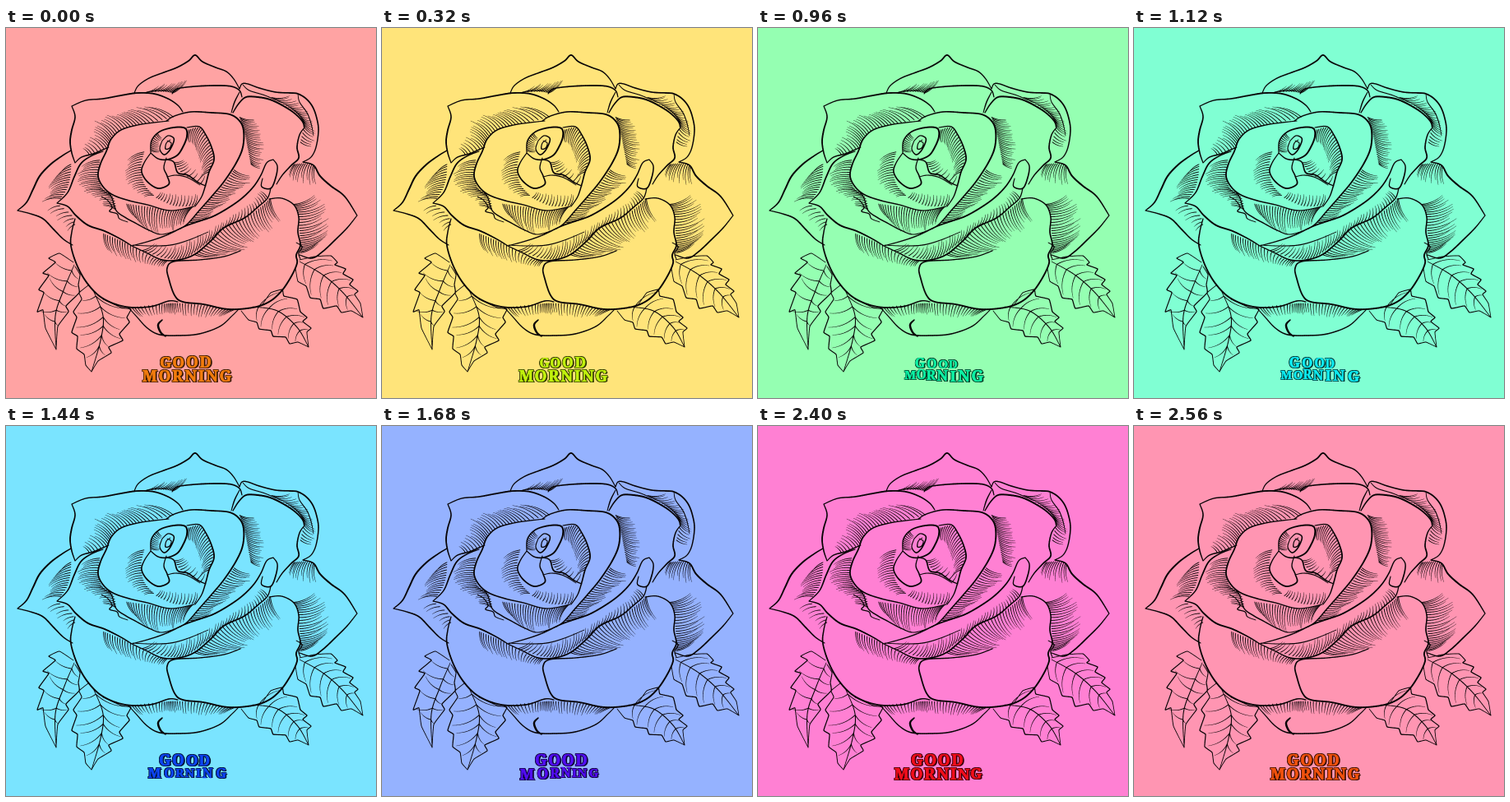
Write an HTML page with a canvas that moves like this. It is 450x450 px and loops after 2.64 s.

```html
<!DOCTYPE html>
<html lang="en">
<head>
<meta charset="utf-8">
<title>Good morning rose</title>
<style>
  html, body { margin: 0; width: 100%; height: 100%; overflow: hidden; }
  body { position: relative; background: #ffa3a3; }
  canvas { position: absolute; left: 0; top: 0; width: 450px; height: 450px; }
  .line {
    position: absolute; left: 140px; width: 160px; height: 17px;
    display: flex; justify-content: center;
    font: 900 19px/17px "Noto Serif", serif;
    color: var(--ink);
  }
  .line span {
    margin: 0 .8px;
    -webkit-text-stroke: .7px var(--ink);
    text-shadow: -1px -1px var(--edge), 1px -1px var(--edge), -1px 1px var(--edge),
      1px 1px var(--edge), 2px 1px var(--edge), -1px 0 var(--edge), 1px 0 var(--edge);
  }
  #good { top: 398px; margin-left: -2px; }
  #morning { top: 415px; }
</style>
</head>
<body>
<canvas id="rose" width="900" height="900"></canvas>
<div class="line" id="good"></div>
<div class="line" id="morning"></div>
<script>
const ctx = document.getElementById('rose').getContext('2d');
ctx.scale(2, 2);
ctx.lineCap = 'round';
ctx.strokeStyle = '#080406';

let seed = 7;
const rand = () => (seed = seed * 16807 % 2147483647) / 2147483647;
const mix = (a, b, u) => [a[0] + (b[0] - a[0]) * u, a[1] + (b[1] - a[1]) * u];

// Cubic through the points of "x y x y ..."; tension 0 gives straight pieces.
function curve(text, tension = .5) {
  const n = text.match(/\d+/g).map(Number), p = [];
  for (let i = 0; i < n.length; i += 2) p.push([n[i], n[i + 1]]);
  const last = p.length - 1;
  const at = u => {
    const s = Math.min(Math.max(u, 0), 1) * last, i = Math.min(Math.floor(s), last - 1), t = s - i;
    const a = p[Math.max(i - 1, 0)], b = p[i], c = p[i + 1], d = p[Math.min(i + 2, last)];
    if (!tension) return mix(b, c, t);
    const t2 = t * t, t3 = t2 * t;
    return [0, 1].map(k =>
      (2 * t3 - 3 * t2 + 1) * b[k] + (t3 - 2 * t2 + t) * tension * (c[k] - a[k]) +
      (3 * t2 - 2 * t3) * c[k] + (t3 - t2) * tension * (d[k] - b[k]));
  };
  at.steps = last * 10;
  return at;
}

function stroke(at, steps, width) {
  for (let i = 0; i < steps; i++) {
    ctx.lineWidth = width((i + .5) / steps);
    ctx.beginPath();
    ctx.moveTo(...at(i / steps));
    ctx.lineTo(...at((i + 1) / steps));
    ctx.stroke();
  }
}

function line(text, w = 1.7, tension) {
  const c = curve(text, tension);
  stroke(c, c.steps, u => w * (.6 + .4 * Math.sin(Math.PI * u)));
  return c;
}

function hair(a, b, bend, w = .95) {
  const dx = b[0] - a[0], dy = b[1] - a[1];
  const at = u => {
    const [x, y] = mix(a, b, u), k = bend * 4 * u * (1 - u);
    return [x - dy * k, y + dx * k];
  };
  stroke(at, 8, u => w * (1 - .65 * u));
}

// Tapering hairs rooted on one curve, ending near another.
function hatch(from, to, n, bend = .08) {
  const a = curve(from), b = curve(to);
  for (let i = 0; i < n; i++) {
    const u = (i + .5) / n, root = a(u);
    hair(root, mix(root, b(u), .72 + .28 * rand()), bend);
  }
}

function leaf(left, right, rib) {
  const sides = [line(left, 1.2, .18), line(right, 1.2, .18)], mid = line(rib, 1.1);
  sides.forEach((side, k) => {
    for (let u = .1; u < .85; u += .125) {
      const root = mid(u);
      hair(root, mix(root, side(u + .12), .88), k ? .1 : -.1);
    }
  });
}

// Back petals
line('156 79 161 70 174 61 192 54 208 48 222 40 230 33 239 41 255 48 268 53 277 62 284 74');
line('202 80 208 74 230 71 255 70 274 71 284 76 287 84');
line('284 78 278 90 274 103', 1.4);
hatch('170 78 190 77 204 79', '190 68 208 66 222 62', 12);
line('284 74 287 68 294 68 308 73 328 78 346 79 355 80 365 86 373 96 378 110 380 125 377 145 371 157 361 163');
line('355 80 357 90 366 103 371 116 374 131', 1.1);
line('288 69 296 76 315 82 336 91', 1.1);
hatch('322 84 342 95 356 106 362 118 358 140', '345 82 362 95 372 112 376 130 374 146', 24);

// Upper petals
line('215 102 209 94 197 86 180 80 160 79 140 82 118 86 97 88 80 95', 1.8);
line('80 95 84 108 80 124 78 138 80 152 84 164', 1.8);
line('84 164 92 157 106 153 118 148 125 145', 1.5);
hatch('100 154 122 146 130 130 150 120 175 115 205 108', '92 146 103 130 108 112 128 104 145 98 172 95', 32);
line('276 103 283 92 292 84 306 84 321 87 336 94 350 103 360 113 363 121', 2);
line('363 121 357 130 354 145 356 158 347 167 336 179 329 190', 1.7);
hatch('284 108 290 125 294 145 298 166', '303 111 312 130 314 152 310 172', 26);

// Outer side petals
line('79 149 69 155 54 166 41 180 33 196 25 212 14 222', 2);
line('14 222 30 226 45 232 58 245 70 257 81 264');
hatch('79 165 78 180 74 195 66 208', '62 180 52 192 48 203 42 212', 15);
hatch('64 215 80 228 84 240', '47 222 62 234 76 248', 7);
line('361 163 374 167 382 180 395 192 412 205 427 228', 2);
line('427 228 415 243 400 258 385 272 372 280 357 276');
hatch('350 166 363 165 376 168', '342 183 356 188 378 192', 12);
hatch('350 214 356 225 357 245 359 262 358 274', '381 200 390 215 393 233 391 250 381 262', 24);

// Left middle petal
line('62 213 75 200 83 181 91 165 103 156 118 150');
line('62 213 75 217 85 228 100 240 120 247 140 257 153 265', 1.9);
hatch('114 160 112 178 116 194 130 206 134 222', '92 168 85 182 90 195 108 206 118 216', 25);
line('116 205 124 210 129 218 126 223 135 226 138 232 148 236', 1.2);

// Inner left petal and the ones in front of it
line('198 113 180 115 160 118 140 124 128 135 122 150 115 165 112 180 118 193 130 203 150 210 172 215 200 222 229 217');
line('118 193 128 205 134 222 146 231 157 237 174 246 190 251 213 244', 1.4);
hatch('168 150 164 170 168 190 180 204', '148 160 143 178 150 194 168 206', 20);
hatch('146 214 175 218 205 222 228 217', '160 234 178 250 200 249 216 238', 28);

// Upper centre petal
line('195 113 205 107 225 102 250 103 272 105 284 113 289 125 288 145 280 164 265 187 250 205 235 222 222 237 214 243', 1.9);
hatch('222 237 240 216 262 194 278 172', '246 231 268 212 288 196 303 182', 26);

// Bud
line('176 152 177 137 187 126 204 121 218 122 220 132 215 145 208 155 196 160 185 159 176 152', 1.9);
line('190 137 197 131 204 134 203 141 198 150 192 154 187 147 190 137', 1.5);
line('196 137 201 140 199 146 194 147 195 140 200 136', 1.2);
line('176 152 168 164 165 175 172 187 185 195 198 190 196 180 192 170 195 158');
line('195 160 204 163 209 176 221 179 234 188 243 192', 1.7);
line('220 121 235 120 243 130 250 145 253 160 247 175 243 190 238 205 230 217');
line('196 181 207 179 221 182 236 191', 1.2);
hatch('177 150 177 138 185 128', '190 152 186 142 190 134', 11);
hatch('222 124 236 122 246 138 252 156 246 176', '222 140 228 146 234 158 238 170 236 184', 22);
hatch('205 163 214 176 238 190', '216 160 226 168 243 180', 10);
hatch('182 206 205 216 230 216', '188 199 208 202 235 200', 14);

// Folded front lip
line('325 160 317 164 310 179 301 193 287 207 270 219 252 229 235 235 218 241 195 252 175 259 153 265', 1.8);
line('325 160 330 168 328 182 322 195 311 193 312 183', 1.6);
line('322 195 318 207 306 218 290 231 265 243 250 258 230 275 210 282 190 282 170 273 153 265', 1.8);
line('154 264 175 265 200 264 222 258 246 248', 1.2);
hatch('165 270 195 280 220 278 245 260 270 240 300 224 318 205', '180 262 205 264 225 256 250 243 275 228 297 212 308 196', 42);

// Lower petals
line('84 232 80 248 79 265 87 290 100 312 118 329 145 339 175 339 198 332 209 333', 1.9);
hatch('118 250 135 257 155 266 180 280 196 284', '124 272 140 280 158 285 175 288 190 292', 25);
line('320 208 335 207 350 215 356 230 355 248 358 264 353 276 354 286 347 302 335 320 320 333 300 340 270 342 240 336 215 333 205 325 198 305 196 292 204 284 235 282 265 278 285 271', 1.9);
line('353 261 360 266 356 274 358 281', 1.3);
hatch('322 207 310 218 290 232 265 244 245 262 228 276', '334 234 322 246 308 260 300 268 282 273 252 278', 32);
line('148 339 158 350 172 365 187 373 210 374 235 372 260 363 275 350 283 342', 1.5);
line('190 355 185 361 188 370 194 375', 2.4);
hatch('152 340 190 336 210 335 245 338 278 343', '164 352 190 350 212 350 240 352 262 351', 38, .03);

// Leaves
leaf('82 285 65 274 52 280 60 285 45 298 52 301 40 318 46 322 38 345 45 343 48 365 61 391',
  '84 290 90 300 88 312 89 322 73 338 76 345 63 363 61 391', '83 288 70 319 60 350 61 391');
leaf('100 313 89 322 92 330 82 345 86 352 80 370 87 375 86 390 95 397 97 410 104 418',
  '118 330 140 340 152 342 147 352 150 358 138 372 142 380 125 388 128 395 112 405 104 418', '106 319 118 350 115 380 104 418');
leaf('357 282 375 278 395 277 403 285 400 288 413 293 410 299 422 306 418 312 428 320 424 324 431 335 434 352',
  '352 292 355 308 365 314 370 328 382 330 386 341 402 338 408 346 420 344 434 352', '357 284 385 300 410 322 434 352');
leaf('312 336 322 322 336 318 338 326 354 330 358 345 366 352 361 357 371 365 366 370 368 388',
  '286 344 295 355 305 358 308 366 322 368 325 375 340 376 345 384 355 382 368 388', '300 339 330 344 354 364 368 388');

// Lettering: every letter dips towards the middle of the words in turn.
const MID = { x: 220, y: 416 }, letters = [];
function spell(id, word, start, gap) {
  const row = document.getElementById(id);
  [...word].forEach((ch, i) => {
    const el = row.appendChild(document.createElement('span'));
    el.textContent = ch;
    letters.push({ el, row, peak: start + gap * i });
  });
}
spell('good', 'GOOD', 620, 85);
spell('morning', 'MORNING', 1060, 128);
for (const { el, row } of letters) {
  const box = el.getBoundingClientRect();
  el.style.transformOrigin = `${MID.x - box.left}px ${MID.y - row.offsetTop}px`;
}

const STEP = 80, COUNT = 33, HALF = 800;
const tone = deg => Math.min(255, Math.round(207 + 89 * Math.cos(deg * Math.PI / 180)));

function draw(now) {
  const step = Math.floor(now / STEP) % COUNT, t = step * STEP, hue = 360 * step / COUNT;
  const root = document.body.style;
  root.background = `rgb(${tone(hue)}, ${tone(hue - 120)}, ${tone(hue + 120)})`;
  root.setProperty('--ink', `hsl(${hue + 29}, 90%, 50%)`);
  root.setProperty('--edge', `hsl(${hue + 24}, 90%, 11%)`);
  for (const { el, peak } of letters) {
    const d = Math.max(-1, Math.min(1, (t - peak) / HALF));
    el.style.transform = `scale(${1 - .23 * Math.cos(d * Math.PI / 2) ** 2})`;
  }
}

const begin = performance.now();
function tick() {
  draw(performance.now() - begin);
  requestAnimationFrame(tick);
}
tick();
</script>
</body>
</html>
```
